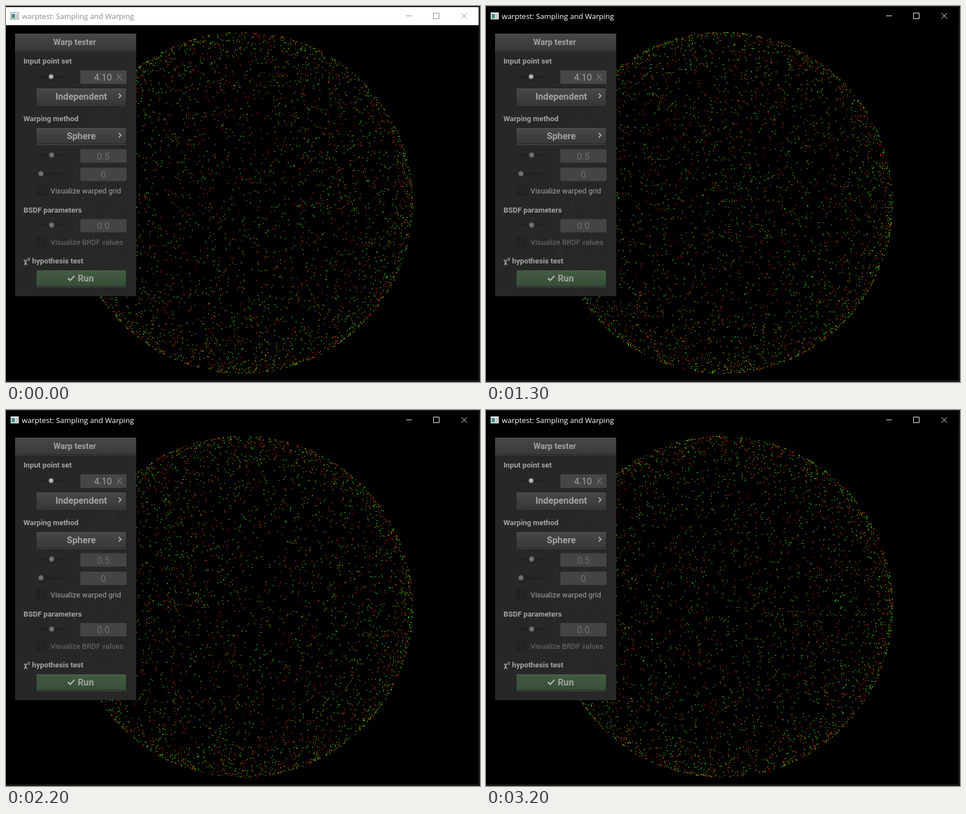
An HTML page with a canvas that plays this animation: 841 px wide and 666 px high, repeating every 3800 ms.

```html
<!DOCTYPE html>
<html lang="en">
<head>
<meta charset="utf-8">
<title>Sampling and Warping</title>
<style>
  html, body { margin: 0; width: 841px; height: 666px; overflow: hidden; background: #000; }
  canvas, svg { position: absolute; left: 0; top: 0; display: block; }
  text { font-family: Roboto, "Liberation Sans", sans-serif; font-size: 13.2px; fill: #a2a2a2; }
  .bold { font-weight: 700; }
  .mid { text-anchor: middle; }
  .big { font-size: 16.3px; }
  .off { fill: #6e6e6e; }
  #caption { font-family: "Open Sans", "Noto Sans", sans-serif; font-size: 13.15px; }
  .line { fill: none; stroke-width: 1; }
</style>
</head>
<body>
<canvas id="stage" width="841" height="666"></canvas>
<svg width="841" height="666" viewBox="0 0 841 666">
  <defs>
    <linearGradient id="grey" x2="0" y2="1">
      <stop stop-color="#484848"/><stop offset="1" stop-color="#383838"/>
    </linearGradient>
    <linearGradient id="green" x2="0" y2="1">
      <stop stop-color="#425c42"/><stop offset="1" stop-color="#364e37"/>
    </linearGradient>
    <linearGradient id="teal" x2="0" y2="1">
      <stop stop-color="#3f7fae"/><stop offset="1" stop-color="#4fa36a"/>
    </linearGradient>
  </defs>

  <path d="M0 0H841V666H0V663H838V2H0Z" fill="#1b1b1b"/>
  <rect id="bar" y="2" width="838.5" height="32"/>
  <rect x="8.5" y="11.5" width="14" height="12" fill="#f4f4f4" stroke="#8c8c8c"/>
  <rect x="10" y="14" width="6" height="8" fill="url(#teal)"/>
  <rect x="17" y="14" width="4" height="8" fill="#c4c8cc"/>
  <text id="caption" x="28" y="23">warptest: Sampling and Warping</text>
  <path id="buttons" class="line" d="M710 17.5H720M758.5 12.5h10v10h-10zM808 12.5l10 10M818 12.5l-10 10"/>

  <rect x="16" y="49" width="215" height="465" rx="2" fill="#2b2b2b" fill-opacity=".91"/>
  <path d="M16 80V51q0-2 2-2H229q2 0 2 2V80Z" fill="url(#grey)"/>
  <path class="line" d="M16 49.5H231" stroke="#505050"/>
  <path class="line" d="M16 79.5H231" stroke="#1c1c1c"/>
  <path class="line" d="M16 80.5H231" stroke="#454545"/>
  <text class="bold mid" x="122" y="69" style="font-size:14.5px">Warp tester</text>
  <g id="panel"></g>
</svg>
<script>
const $ = id => document.getElementById(id);

// Panel widgets
const parts = [];
const add = s => parts.push(s);
const label = (y, s) => add(`<text class="bold" x="31" y="${y}">${s}</text>`);
const button = (y, s, fill = 'grey', x = 133.5) => add(
  `<rect x="53.5" y="${y + .5}" width="160" height="29" rx="2" fill="url(#${fill})" stroke="#1f1f1f"/>
   <path class="line" d="M55 ${y + 1.5}H212" stroke="#5c5c5c" stroke-opacity=".7"/>
   <path class="line" d="M54 ${y + 30.5}H213" stroke="#555"/>
   <text class="bold mid big" x="${x}" y="${y + 21}">${s}</text>`);
const chevron = y => add(`<path class="line" d="M200 ${y - 4}l4 4l-4 4" stroke="#a8a8a8" style="stroke-width:2"/>`);
const field = (y, s) => add(
  `<rect x="132" y="${y}" width="82" height="24" rx="2" fill="#444"/>
   <path class="line" d="M133 ${y + .5}H213" stroke="#3a3a3a"/>
   <text class="mid big off" x="172.5" y="${y + 18}">${s}</text>`);
const slider = (y, x, from, knob) => add(
  `<rect x="${from}" y="${y - 2}" width="${101 - from}" height="5" rx="2" fill="#202020"/>
   <circle cx="${x}" cy="${y}" r="6" fill="#222"/>
   <circle cx="${x}" cy="${y}" r="5.2" fill="#4c4c4c"/>
   <circle cx="${x}" cy="${y}" r="3.5" fill="${knob}"/>`);
const check = (y, s, off = '') => add(
  `<rect x="54.5" y="${y + .5}" width="17" height="17" rx="2" fill="#232323" stroke="#1a1a1a"/>
   <text class="${off}" x="79" y="${y + 14}">${s}</text>`);

label(102, 'Input point set');
slider(125, 80, 62, '#b8b8b8');
add('<rect x="132" y="114" width="82" height="24" rx="2" fill="#464646"/>' +
    '<text class="mid big" x="172" y="132">4.10</text><text class="big off" x="196.5" y="132">K</text>');
button(145, 'Independent');
chevron(159);
label(204, 'Warping method');
button(215, 'Sphere');
chevron(229);
slider(264, 81, 62, '#747474');
field(253.5, '0.5');
slider(297, 62, 60, '#747474');
field(286, '0');
check(318, 'Visualize warped grid');
label(366, 'BSDF parameters');
slider(388, 81, 62, '#747474');
field(377, '0.0');
add('<text class="big" x="201" y="395" style="fill:#555">°</text>');
check(409, 'Visualize BRDF values', 'off');
label(456, 'χ² hypothesis test');
button(467, 'Run', 'green', 141.5);
add('<path class="line" d="M110 482l4 4l7.5-8" stroke="#b0b0b0" style="stroke-width:2.5"/>');
$('panel').innerHTML = parts.join('');

// Random points on a sphere, tinted red to green by index
const COUNT = 4100, RADIUS = .5, DISTANCE = 2, CX = 419.5, CY = 348.5, DOT = 1.5;
const FOCAL = 302 / Math.tan(Math.asin(RADIUS / DISTANCE));
let seed = 20117;
const random = () => {
  seed = seed + 0x6D2B79F5 | 0;
  let t = Math.imul(seed ^ seed >>> 15, 1 | seed);
  t = t + Math.imul(t ^ t >>> 7, 61 | t) ^ t;
  return ((t ^ t >>> 14) >>> 0) / 4294967296;
};
const points = Array.from({ length: COUNT }, (_, i) => {
  const z = 1 - 2 * random(), a = 2 * Math.PI * random(), r = Math.sqrt(1 - z * z), mix = i / COUNT;
  return {
    x: RADIUS * r * Math.cos(a), y: RADIUS * r * Math.sin(a), z: RADIUS * z,
    color: `rgb(${255 * (1 - mix) | 0},${255 * mix | 0},0)`
  };
});

const ctx = $('stage').getContext('2d');
function draw(step) {
  const yaw = .07 * step, pitch = .22 * Math.sin(step * .2);
  const cy = Math.cos(yaw), sy = Math.sin(yaw), cp = Math.cos(pitch), sp = Math.sin(pitch);
  ctx.fillStyle = '#000';
  ctx.fillRect(0, 0, 841, 666);
  for (const p of points) {
    const x = p.x * cy + p.z * sy, depth = p.z * cy - p.x * sy;
    const y = p.y * cp - depth * sp, z = p.y * sp + depth * cp;
    const k = FOCAL / (DISTANCE - z);
    ctx.fillStyle = p.color;
    ctx.fillRect(Math.round(CX + x * k - DOT / 2), Math.round(CY + y * k - DOT / 2), DOT, DOT);
  }
  const active = step > 0;
  $('bar').setAttribute('fill', active ? '#000' : '#fff');
  $('caption').style.fill = active ? '#fff' : '#8a8a8a';
  $('buttons').setAttribute('stroke', active ? '#fff' : '#8a8a8a');
}

// The view turns every 100 ms between two 600 ms rests
let shown = -1;
function tick(now) {
  const t = now % 3800;
  const step = t < 600 ? 0 : Math.min(27, Math.floor((t - 500) / 100));
  if (step !== shown) draw(shown = step);
  requestAnimationFrame(tick);
}
tick(performance.now());
</script>
</body>
</html>
```
